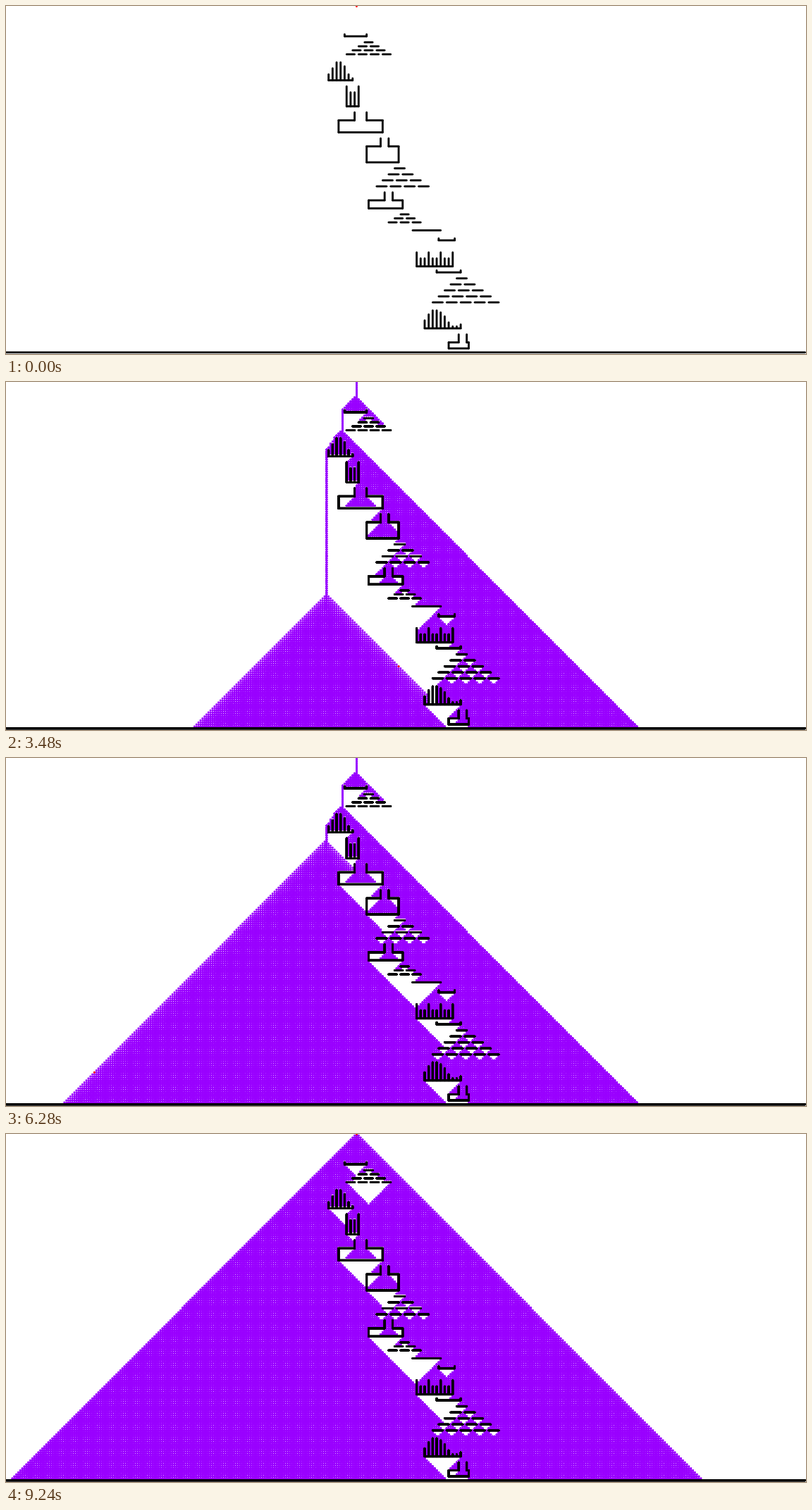
A matplotlib script for the animation above (9320 ms loop, 1135 by 494 pixels).

```python
import math
import numpy as np
import matplotlib.pyplot as plt
from matplotlib.animation import FuncAnimation
from matplotlib.collections import LineCollection
from matplotlib.patches import Circle

W, H, DPI = 1135, 494, 100
PITCH, SHIFT, RADIUS = 2.84, 0.42, 1.45   # cell size, first centre, grain radius
COLS, ROWS = 402, 176
SOURCE = (175, 0)
PURPLE = np.array([153, 0, 255])
TICK, FRAMES = 40, 233
STEP, BATCH = 66.01, 200                  # ms per update, grains per update
LAYERS = 8                                # repaints until soft edges settle

# Obstacles hang one below another, always three rows apart.
walls = []
base = 12


def lower(height):
    global base
    base += 3 + height
    return base


def path(*pts):
    walls.extend(zip(pts, pts[1:]))


def bar(x, width, height):
    y = lower(height)
    path((x, y), (x + width, y))


def cup(x, width, height=0):
    y = lower(height)
    path((x, y - 1), (x, y), (x + width, y), (x + width, y - 1))


def comb(x, teeth, mid, swing, period, peak):
    y = lower(10)
    path((x, y), (x + 2 * teeth - 2, y))
    for i in range(teeth):
        tall = round(mid + swing * math.cos(2 * math.pi * (i - peak) / period))
        path((x + 2 * i, y), (x + 2 * i, y - tall))


def jar(x, width, height, inset, neck):
    y = lower(height)
    top, right, n0, n1 = y - height, x + width, x + inset, x + inset + neck
    path((n0, top), (n0, top + 4), (x, top + 4), (x, y),
         (right, y), (right, top + 4), (n1, top + 4), (n1, top))


def ledges(x, rows, size):
    gap = size - 2
    top = lower(gap * (rows - 1)) - gap * (rows - 1)
    for r in range(rows):
        for i in range(r + 1):
            left = x - 3 * r + (size + 2) * i
            path((left, top + gap * r), (left + size, top + gap * r))


cup(169, 11)
ledges(179, 4, 4)
comb(161, 7, 5.3, 4, 7, 2.6)
comb(170, 4, 8.3, 1.7, 3, 0)
jar(166, 22, 10, 8, 6)
jar(180, 16, 12, 7, 4)
ledges(194, 4, 5)
jar(181, 17, 8, 8, 4)
ledges(197, 3, 4)
bar(203, 14, 1)
cup(216, 8, 2)
comb(205, 10, 5, 2, 3, 0)
cup(215, 12)
ledges(225, 5, 5)
comb(209, 10, 5, 4, 10, 2.7)
jar(221, 10, 7, 5, 4)
floor = base + 2
path((0, floor), (399, floor))

rock = np.zeros((ROWS, COLS), bool)
for (xa, ya), (xb, yb) in walls:
    rock[min(ya, yb):max(ya, yb) + 1, min(xa, xb):max(xa, xb) + 1] = True

# Each cell stores how many grains had settled when it was first reached.
NEVER = 10 ** 6
reached = np.full((ROWS, COLS), NEVER)
settled = []


def fall(x, y):
    reached[y, x] = len(settled)
    for nx in (x, x - 1, x + 1):
        if not rock[y + 1, nx] and reached[y + 1, nx] == NEVER:
            fall(nx, y + 1)
    settled.append((x, y))


fall(*SOURCE)


def nearby(n, fine=4):
    """The two cells around each pixel, with squared subpixel distances."""
    first = ((np.arange(n) + 0.5 - SHIFT) / PITCH).astype(int)
    pos = ((np.arange(n * fine) + 0.5) / fine - SHIFT).astype(np.float32)
    for cell in (first, first + 1):
        yield cell, (pos - np.repeat(cell, fine) * np.float32(PITCH)) ** 2


def clearness(dx2, dy2):
    """Log of the background share that one grain leaves in each pixel."""
    inside = dy2[:, None] + dx2[None] < RADIUS ** 2
    cover = inside.reshape(H, 4, W, 4).mean(axis=(1, 3))
    return np.log1p(-np.minimum(cover, 0.99)).astype(np.float32)


across, down = list(nearby(W)), list(nearby(H))
veils = [(col, row, clearness(dx2, dy2))
         for col, dx2 in across for row, dy2 in down]
palette = np.uint8(np.linspace([255] * 3, PURPLE, 256).round())


def picture(k):
    coats = np.clip(k - reached // BATCH, 0, LAYERS).astype(np.float32)
    light = sum(coats.take(col, axis=1).take(row, axis=0) * veil
                for col, row, veil in veils)
    return palette[np.uint8(255 * (1 - np.exp(light)))]


def place(x, y):
    return x * PITCH + SHIFT, y * PITCH + SHIFT


fig = plt.figure(figsize=(W / DPI, H / DPI), dpi=DPI, facecolor="white")
ax = fig.add_axes([0, 0, 1, 1])
sand = ax.imshow(picture(0), extent=(0, W, H, 0), interpolation="nearest",
                 aspect="auto")
grain = ax.add_patch(Circle(place(*SOURCE), RADIUS, fc="red", lw=0, zorder=2))
segments = [(place(*a), place(*b)) for a, b in walls]
lines = LineCollection(segments, colors="black", linewidths=PITCH * 72 / DPI,
                       capstyle="round", zorder=3)
lines.set_snap(False)
ax.add_collection(lines)
ax.set_xlim(0, W)
ax.set_ylim(H, 0)
ax.axis("off")


def update(n):
    k = int((n + 0.5) * TICK / STEP)
    count = min(BATCH * k, len(settled))
    sand.set_data(picture(k))
    grain.center = place(*(settled[count - 1] if count else SOURCE))
    lines.set_segments(segments * min(k + 1, LAYERS))
    return sand, grain, lines


anim = FuncAnimation(fig, update, frames=FRAMES, interval=TICK, repeat=True,
                     repeat_delay=0, blit=False)
plt.show()
```
